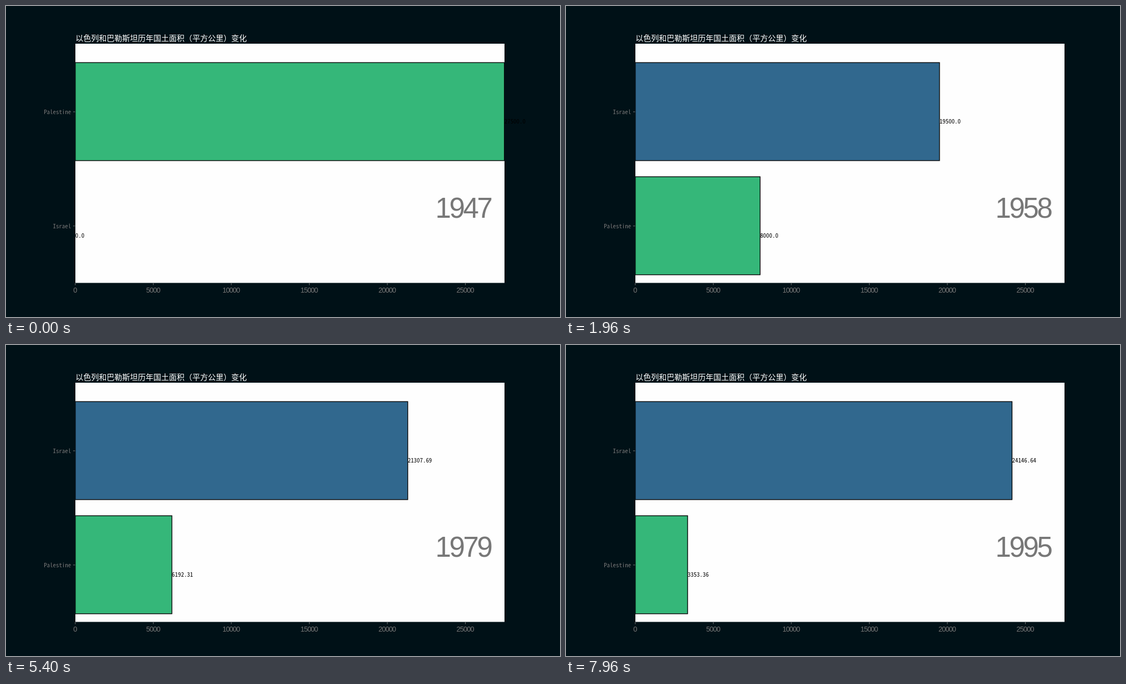
Write an HTML page that moves like this. It is 998 px wide and 561 px high and loops after 8 s.

```html
<!DOCTYPE html>
<html lang="zh-CN">
<head>
<meta charset="utf-8">
<title>国土面积变化</title>
<style>
  html, body { margin: 0; width: 100%; height: 100%; overflow: hidden; background: #001117; }
  svg { display: block; width: 100vw; height: 100vh; }
  text { font-family: "Noto Sans Mono CJK SC", "Noto Sans CJK SC", "Noto Sans CJK", "Noto Sans CJK JP", sans-serif; }
  .tick { stroke: #777; stroke-width: 1; }
  .xlabel, .year { fill: #777; text-anchor: middle; font-family: "Liberation Sans", Arial, sans-serif; letter-spacing: -0.066em; }
  .xlabel { font-size: 12.7px; }
  .year { font-size: 51px; }
  .name { fill: #777; font-size: 10.9px; text-anchor: end; }
  .value { fill: #000; font-size: 10.9px; }
  .bar { stroke: #000; stroke-width: 1.35; }
  .title { fill: #fff; font-size: 14.04px; }
</style>
</head>
<body>
<svg viewBox="0 0 998 561">
  <defs><clipPath id="plot"><rect x="124.6" y="68" width="773.4" height="431.5"/></clipPath></defs>
  <rect x="125" y="68" width="773" height="431.5" fill="#fefefe"/>
  <g id="bars" clip-path="url(#plot)"></g>
  <g id="axis"></g>
  <g id="labels"></g>
  <text class="title" x="125.2" y="62.6">以色列和巴勒斯坦历年国土面积（平方公里）变化</text>
  <text class="year" id="year" x="823.6" y="382.3"></text>
</svg>
<script>
const LOOP = 8000, STEP = 40, TOTAL = 27500;
const LEFT = 124.8, SCALE = 0.028108;
const ROW_TOP = 102.1, ROW_GAP = 205.9, BAR_HEIGHT = 176.8;
// [step, area of the first country]; the second holds the rest of TOTAL
const KEYS = [[0, 0], [14, 19000], [84, 20000], [162, 22000], [220, 25365]];

const byId = id => document.getElementById(id);
const xOf = value => LEFT + value * SCALE;

function add(parent, tag, attrs, text = "") {
  const node = document.createElementNS("http://www.w3.org/2000/svg", tag);
  for (const key in attrs) node.setAttribute(key, attrs[key]);
  node.textContent = text;
  return byId(parent).appendChild(node);
}

for (let value = 0; value <= 25000; value += 5000) {
  const x = xOf(value);
  add("axis", "line", { class: "tick", x1: x, x2: x, y1: 500, y2: 503.5 });
  add("axis", "text", { class: "xlabel", x: x - 0.4, y: 516.5 }, value);
}
for (const row of [0, 1]) {
  const y = ROW_TOP + BAR_HEIGHT / 2 + row * ROW_GAP + 0.4;
  add("axis", "line", { class: "tick", x1: 121, x2: 124.4, y1: y, y2: y });
}

const countries = [["Israel", "#31688e"], ["Palestine", "#35b779"]].map(([name, fill]) => ({
  bar: add("bars", "rect", { class: "bar", x: LEFT, height: BAR_HEIGHT, fill }),
  name: add("labels", "text", { class: "name", x: 117.2 }, name),
  value: add("labels", "text", { class: "value" })
}));

function areaAt(step) {
  const i = KEYS.findIndex(([end]) => step < end);
  const [s0, v0] = KEYS[i - 1], [s1, v1] = KEYS[i];
  return v0 + (v1 - v0) * (step - s0) / (s1 - s0);
}

function format(value) {
  const rounded = Math.round(value * 100) / 100;
  return Number.isInteger(rounded) ? rounded + ".0" : String(rounded);
}

function place({ bar, name, value }, area, row) {
  const y = ROW_TOP + row * ROW_GAP;
  bar.setAttribute("y", y);
  bar.setAttribute("width", area * SCALE);
  name.setAttribute("y", y + 92.9);
  value.setAttribute("x", xOf(area));
  value.setAttribute("y", y + 110);
  value.textContent = format(area);
}

function draw() {
  const step = Math.floor(performance.now() % LOOP / STEP);
  const area = areaAt(step), rest = TOTAL - area;
  const firstLeads = area > rest;
  place(countries[0], area, firstLeads ? 0 : 1);
  place(countries[1], rest, firstLeads ? 1 : 0);
  byId("year").textContent = 1947 + Math.max(0, Math.floor((step - 5) / 4));
  requestAnimationFrame(draw);
}
draw();
</script>
</body>
</html>
```
